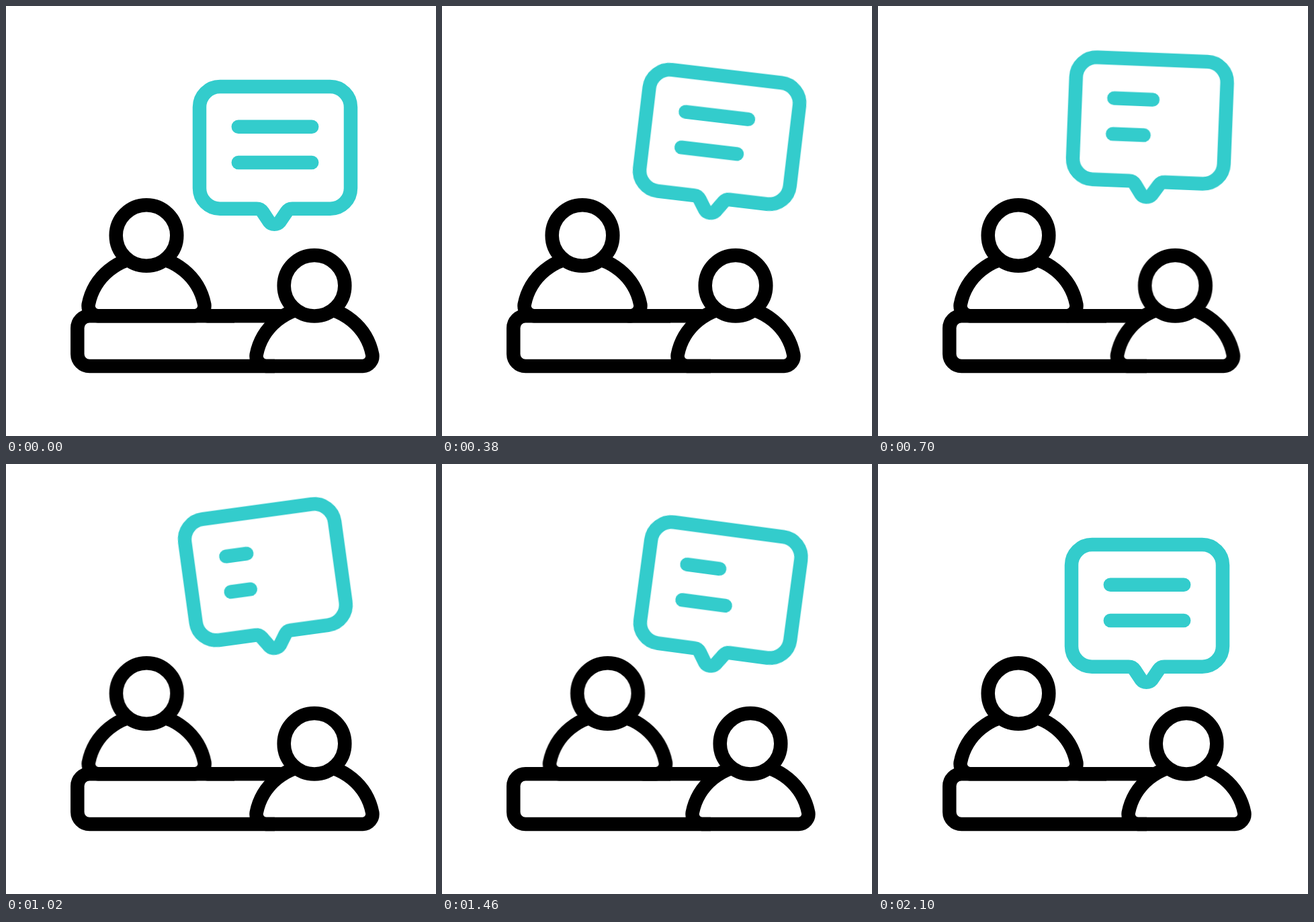
Animation, 640 px wide and 640 px high, one loop 2.52 s. Source, as an HTML page:

```html
<!DOCTYPE html>
<html lang="en">
<head>
<meta charset="utf-8">
<title>Conversation</title>
<style>
  html, body { margin: 0; width: 100%; height: 100%; overflow: hidden; background: #fff; }
  svg { display: block; width: 100%; height: 100%; }

  .ink { fill: none; stroke: #000; stroke-width: 20.5; stroke-linejoin: round; }
  .head { fill: #fff; }
  .talk { fill: none; stroke: #3cc; stroke-width: 20.5; stroke-linecap: round; stroke-linejoin: round; }
  .line { stroke-dasharray: 109.5 300; }

  .near, .far, .lift, .tilt, .line {
    --ease: cubic-bezier(.333, 0, .667, 1);
    animation: 2520ms var(--ease) infinite;
  }
  .near { animation-name: near; }
  .far { animation-name: far; }
  .lift { animation-name: lift; }
  .tilt { animation-name: tilt; transform-origin: 400px 318px; }
  .upper { animation-name: upper; }
  .lower { animation-name: lower; }

  /* Half a second is 19.8413% of the loop; the last part rests. */
  @keyframes near {
    0%, 39.6825%, 100% { transform: translateX(0); }
    19.8413% { transform: translateX(-25.7px); }
  }
  @keyframes far {
    0%, 39.6825%, 79.3651%, 100% { transform: translateX(0); }
    59.5238% { transform: translateX(38.2px); }
  }
  @keyframes lift {
    0%, 79.3651%, 100% { transform: translateY(0); }
    39.6825% {
      transform: translateY(-51.6px);
      animation-timing-function: cubic-bezier(.333, .22, .667, 1);
    }
  }
  @keyframes tilt {
    0%, 79.3651%, 100% { transform: rotate(0deg); }
    19.8413%, 59.5238% { transform: rotate(7.9deg); }
    39.6825% { transform: rotate(-7.9deg); }
  }
  @keyframes upper {
    0%, 3.9683%, 83.3333%, 100% { stroke-dashoffset: 0; }
    43.6508% {
      stroke-dashoffset: 80;
      animation-timing-function: cubic-bezier(.333, 0, .667, .78);
    }
  }
  @keyframes lower {
    0%, 79.3651%, 100% { stroke-dashoffset: 0; }
    39.6825% { stroke-dashoffset: 80.3; }
  }
</style>
</head>
<body>
<svg viewBox="0 0 640 640">
  <defs>
    <g id="person">
      <path d="M-72 0A15 15 0 0 1 -86.3 -17A88 88 0 0 1 86.3 -17A15 15 0 0 1 72 0Z"/>
      <circle class="head" cy="-119.7" r="45.3"/>
    </g>
  </defs>

  <g class="ink">
    <path d="M340 461.2H124.3A18 18 0 0 0 106.3 479.2V518A18 18 0 0 0 124.3 536H400"/>
    <g class="far"><use href="#person" x="209" y="461.2"/></g>
    <g class="near">
      <path d="M300 461.2H408" stroke-linecap="round"/>
      <use href="#person" x="459" y="536"/>
    </g>
  </g>

  <g class="lift">
    <g class="tilt talk">
      <path d="M318.5 120H482.5A30.5 30.5 0 0 1 513 150.5V271.2A30.5 30.5 0 0 1 482.5 301.7H426
        C422 301.7 419.5 303.5 417.5 306.5L407.5 321.2C403.5 326 395.5 326 391.7 321.2L382 306.5
        C380 303.5 377 301.7 373 301.7H318.5A30.5 30.5 0 0 1 288 271.2V150.5A30.5 30.5 0 0 1 318.5 120Z"/>
      <path class="line upper" d="M345.8 179.8H455.2"/>
      <path class="line lower" d="M345.8 233H455.2"/>
    </g>
  </g>
</svg>
</body>
</html>
```
